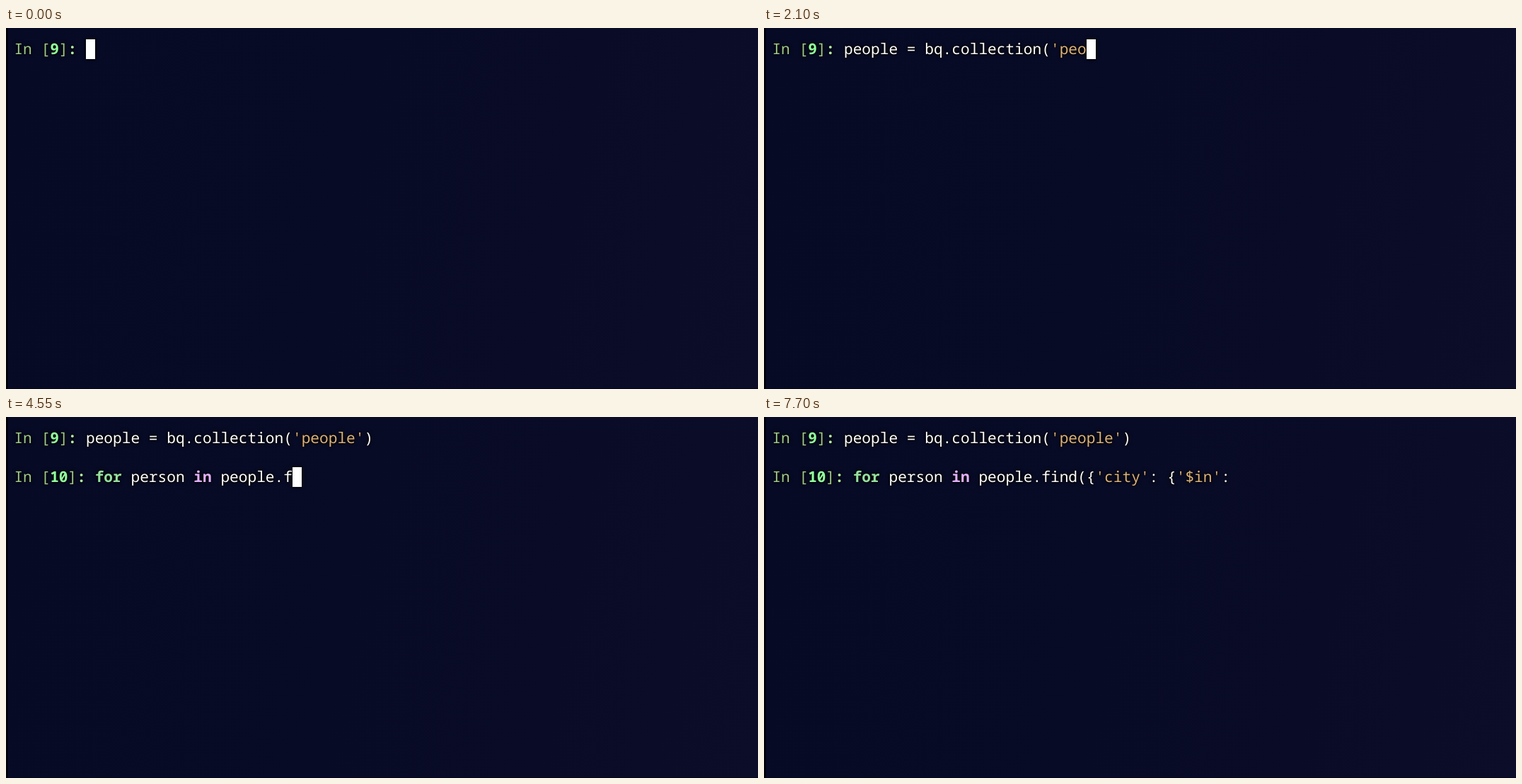
Recreate the animation shown at these times as an HTML page. Size 1063x511 px, loop 8 s.

```html
<!DOCTYPE html>
<html lang="en">
<head>
<meta charset="utf-8">
<title>Typing in a shell</title>
<style>
  html, body { margin: 0; width: 100%; height: 100%; overflow: hidden; background: #000; }
  #stage {
    position: relative; width: 1063px; height: 511px; overflow: hidden;
    background: linear-gradient(100deg, #070a25 0%, #080b26 45%, #0c0d28 100%);
    box-shadow: inset 3px 0 #01020a, inset 0 -1px #04061a;
  }
  .line {
    position: absolute; left: 11.4px; height: 28px; white-space: pre;
    font: 21.167px/28px "Noto Sans Mono", "DejaVu Sans Mono", monospace;
    font-variant-ligatures: none; text-rendering: geometricPrecision;
    color: #fff;
    filter: drop-shadow(0 0 1.5px #000) drop-shadow(0 0 2px #000);
  }
  .prompt { color: #a0c98c; }
  .number { color: #93ff9e; font-weight: 700; }
  .colon { color: #b4f0a8; font-weight: 700; }
  .string { color: #dcb27a; }
  .loop { color: #97dfa0; font-weight: 700; }
  .word { color: #e2b0ff; font-weight: 700; }
  .cursor { position: absolute; top: 0; width: 13px; height: 28px; background: #fff; }
</style>
</head>
<body>
<div id="stage"></div>
<script>
const LOOP = 8000, STEP = 350;
const stage = document.getElementById("stage");

// Each line: top edge, prompt number, coloured pieces, first step, typed characters per step.
const lines = [
  {
    top: 16, number: "9", first: 0,
    code: [["people = bq.collection("], ["'people'", "string"], [")"]],
    typed: [0, 1, 6, 11, 16, 21, 27, 32]
  },
  {
    top: 71, number: "10", first: 8,
    code: [["for", "loop"], [" person "], ["in", "word"], [" people.find({"],
           ["'city'", "string"], [": {"], ["'$in'", "string"], [":"]],
    typed: [0, 4, 9, 14, 18, 22, 26, 29, 33, 35, 38, 41, 42]
  }
];
const CURSOR_OFF = 22;

function add(parent, kind, text = "") {
  const el = document.createElement("span");
  el.className = kind;
  el.textContent = text;
  parent.append(el);
  return el;
}

for (const line of lines) {
  line.box = add(stage, "line");
  line.box.style.top = line.top + "px";
  add(line.box, "prompt", "In [");
  add(line.box, "number", line.number);
  add(line.box, "prompt", "]");
  add(line.box, "colon", ": ");
  line.start = line.box.textContent.length;
  line.spans = line.code.map(() => add(line.box, ""));
  line.cursor = add(line.box, "cursor");
}

function drawLine(line, step, active) {
  const i = step - line.first;
  line.box.style.visibility = i < 0 ? "hidden" : "visible";
  if (i < 0) return;
  const count = line.typed[Math.min(i, line.typed.length - 1)];
  let left = count;
  line.code.forEach(([text, kind = ""], k) => {
    const part = text.slice(0, Math.max(0, left));
    left -= text.length;
    // A keyword takes its colour only once it is whole.
    const plain = kind !== "string" && part !== text;
    line.spans[k].textContent = part;
    line.spans[k].className = plain ? "" : kind;
  });
  line.cursor.style.left = line.start + count + "ch";
  line.cursor.style.display = active && step < CURSOR_OFF ? "block" : "none";
}

const began = performance.now();
let shown = -1;

function draw(now) {
  const step = Math.floor((Math.max(0, now - began) % LOOP) / STEP);
  if (step !== shown) {
    shown = step;
    const current = step < lines[1].first ? 0 : 1;
    lines.forEach((line, i) => drawLine(line, step, i === current));
  }
  requestAnimationFrame(draw);
}
draw(began);
</script>
</body>
</html>
```
